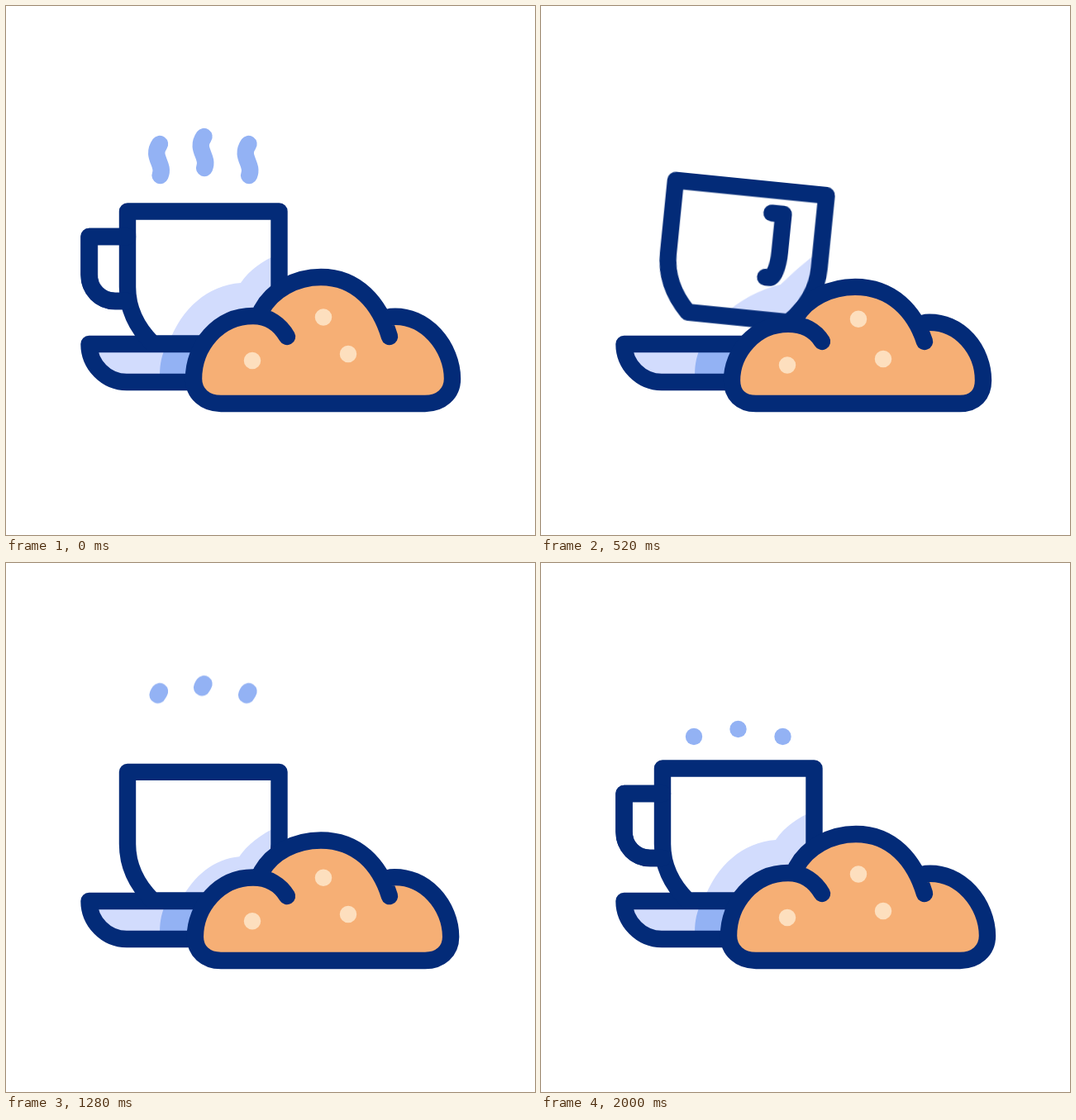
Write an HTML page without scripts that moves like this. It is 640 px wide and 640 px high and loops after 2040 ms.

```html
<!DOCTYPE html>
<html lang="en">
<head>
<meta charset="utf-8">
<title>Coffee and bread</title>
<style>
  html, body { margin: 0; width: 100%; height: 100%; overflow: hidden; background: #fff; }
  svg { display: block; width: 100%; height: 100%; }

  .line { fill: none; stroke: #032b78; stroke-width: 20.4; stroke-linecap: round; stroke-linejoin: round; }
  .pale { fill: #d2dcfd; }
  .blue { fill: #93b2f4; }
  .peach { fill: #f6af75; }
  .dots { fill: none; stroke: #fddfbe; stroke-width: 20.5; stroke-linecap: round; }
  .spark { fill: none; stroke: #fdcb50; stroke-width: 20.5; stroke-linecap: round; }
  .wisp { fill: none; stroke: #93b2f4; stroke-width: 20.4; stroke-linecap: round; }

  .cup, .handle, .rim, .shade, .bread, .dots, .spark, .rise, .wisp, .front {
    animation: 2.04s linear infinite;
  }

  /* Cup: hop and tilt about its lower left corner */
  .cup { transform-origin: 177.6px 408.5px; animation-name: hop; }
  @keyframes hop {
    0%, 18.63% { transform: translateY(0) rotate(0); animation-timing-function: cubic-bezier(.2, .5, .5, 1); }
    39.2% { transform: translateY(-61px) rotate(9.2deg); animation-timing-function: cubic-bezier(.33, 0, .67, .33); }
    60.78%, 100% { transform: translateY(0) rotate(0); }
  }

  .rim { animation-name: squash; }
  @keyframes squash {
    0%, 29.4%, 59.8%, 79.4%, 100% {
      d: path("M147 248.5H330.5V340C330.5 366 319.5 389 300 408.5H177.6C158 389 147 366 147 340Z");
      animation-timing-function: ease-in-out;
    }
    17.2% {
      d: path("M147 261.5H330.5V340C330.5 366 319.5 389 300 408.5H177.6C158 389 147 366 147 340Z");
      animation-timing-function: ease-in-out;
    }
    65.7% {
      d: path("M147 257H330.5V340C330.5 366 319.5 389 300 408.5H177.6C158 389 147 366 147 340Z");
      animation-timing-function: ease-in-out;
    }
  }

  /* Handle: one turn around the cup, in front first, then behind */
  .handle { transform-origin: 238.7px 0; animation-name: turn; }
  .handle path { vector-effect: non-scaling-stroke; }
  @keyframes turn {
    0% { transform: scaleX(1); }
    4.4% { transform: scaleX(.94); }
    8.8% { transform: scaleX(.766); }
    13.2% { transform: scaleX(.5); }
    17.65% { transform: scaleX(.173); }
    25.49% { transform: scaleX(-.303); }
    33.3% { transform: scaleX(-.755); }
    37.2% { transform: scaleX(-.91); }
    41.18% { transform: scaleX(-.988); }
    43.1% { transform: scaleX(-1); }
    47.1% { transform: scaleX(-.95); }
    52.94% { transform: scaleX(-.744); }
    58.3% { transform: scaleX(-.4); }
    63.7% { transform: scaleX(-.03); }
    69.1% { transform: scaleX(.37); }
    74.51% { transform: scaleX(.704); }
    80.4% { transform: scaleX(.93); }
    87%, 100% { transform: scaleX(1); }
  }
  .front { animation-name: front; animation-timing-function: step-end; }
  @keyframes front {
    0%, 87%, 100% { opacity: 1; }
    43.1% { opacity: 0; }
  }

  .shade { animation-name: shade; }
  @keyframes shade {
    0%, 71.6%, 100% {
      d: path("M197 408C212 366 244 338 284 335C294 320 310 308 330 300V340C330.5 366 319.5 389 300 408Z");
      animation-timing-function: ease-in-out;
    }
    17.65% {
      d: path("M204 408C222 378 248 358 283 355C293 342 310 333 330 326V340C330.5 366 319.5 389 300 408Z");
    }
    25.49% {
      d: path("M221 408C238 388 262 372 286 364C298 350 312 334 330 318V340C330.5 366 319.5 389 300 408Z");
      animation-timing-function: ease-out;
    }
    41.18% {
      d: path("M221 408C234 386 252 364 276 357C286 332 300 316 330 298V340C330.5 366 319.5 389 300 408Z");
      animation-timing-function: ease-in;
    }
    52.94% {
      d: path("M230 408C244 394 262 382 280 380C290 366 304 354 330 340V340C330.5 366 319.5 389 300 408Z");
      animation-timing-function: ease-in-out;
    }
  }

  /* Bread: left bump, base, right bump, then the dome */
  .bread { animation-name: bread; }
  @keyframes bread {
    0%, 70.6%, 100% {
      d: path("M340 400C332 386 318 375 299 375C256 375 227 412 227 451C227 469 241 481 260 481H507C526 481 540 469 540 451C540 413 508 372 465 376M464 400C452 360 425 328 381 328C350 328 322 344 309 368");
      animation-timing-function: ease-in-out;
    }
    17.2% {
      d: path("M340 412C332 402 318 395 299 395C256 395 233 428 233 456C233 471 243 481 260 481H507C523 481 533 471 533 456C533 423 508 388 465 391M464 411C452 379 425 355 379 355C350 355 322 366 309 386");
      animation-timing-function: ease-in;
    }
    25.49% {
      d: path("M340 406C332 393 318 385 299 385C258 385 231 420 231 453C231 470 242 481 260 481H507C525 481 535 470 535 453C535 418 508 380 465 383M464 406C452 370 425 340 380 340C350 340 322 354 309 376");
      animation-timing-function: ease-out;
    }
    41.18% {
      d: path("M340 394C330 378 316 366 297 366C256 366 227 404 227 446C227 467 241 481 260 481H507C526 481 539.5 467 539.5 446C540 402 510 362 465 367M464 394C452 345 422 310 381 310C345 310 318 336 309 364");
      animation-timing-function: ease-in;
    }
    52.94%, 56.9% {
      d: path("M340 405C332 392 318 384 299 384C258 384 230 420 230 453C230 470 242 481 260 481H507C525 481 537 470 537 453C537 417 508 380 465 383M464 405C452 368 425 340 381 340C350 340 322 354 309 377");
      animation-timing-function: ease-in-out;
    }
  }

  .dots { animation-name: dots; }
  @keyframes dots {
    0%, 70.6%, 100% { d: path("M384 376.5h0M298 429h0M414 421h0"); animation-timing-function: ease-in-out; }
    17.2% { d: path("M384 394.5h0M298 446.5h0M414 436h0"); animation-timing-function: ease-in; }
    25.49% { d: path("M384 379h0M298 434.5h0M414 427h0"); animation-timing-function: ease-out; }
    41.18% { d: path("M384 350h0M298 412h0M414 409h0"); animation-timing-function: ease-in; }
    52.94%, 56.9% { d: path("M384 383.5h0M298 436h0M414 427.5h0"); animation-timing-function: ease-in-out; }
  }

  .spark { animation-name: spark, flash; animation-timing-function: linear, step-end; }
  @keyframes spark {
    0%, 34.3% { d: path("M423 296L423 296M444 309L444 309"); }
    41.18% { d: path("M425 286L430 263M452 305.5L474.5 297"); }
    44.1% { d: path("M426.5 279L431 257M459 303L479.5 295.5"); }
    52.4%, 100% { d: path("M431 257L431 257M479.5 295.5L479.5 295.5"); }
  }
  @keyframes flash {
    0%, 54.9%, 100% { opacity: 0; }
    34.3% { opacity: 1; }
  }

  /* Steam: each wisp grows from below and shrinks at its top while drifting up */
  .rise { animation-name: rise, puff; animation-timing-function: linear, step-end; }
  @keyframes rise {
    0% { transform: translateY(0); }
    17.65% { transform: translateY(-13px); }
    21.5% { transform: translateY(-15px); }
    36.8% { transform: translateY(1px); }
    41.18% { transform: translateY(0); }
    52.94% { transform: translateY(-6px); }
    65.2% { transform: translateY(-13px); }
    72% { transform: translateY(25px); }
    74.51% { transform: translateY(23px); }
    98.04% { transform: translateY(2px); }
    100% { transform: translateY(0); }
  }
  @keyframes puff {
    0%, 72%, 100% { opacity: 1; }
    20.5%, 65.2% { opacity: 0; }
    36.8% { opacity: 1; }
  }
  .wisp { animation-name: trim; }
  @keyframes trim {
    0% { stroke-dasharray: 100 300; stroke-dashoffset: 0; animation-timing-function: cubic-bezier(.4, .2, .7, .9); }
    17.65% { stroke-dasharray: 18 300; stroke-dashoffset: -82; }
    20.5% { stroke-dasharray: 0 300; stroke-dashoffset: -100; }
    20.6%, 36.8% { stroke-dasharray: 0 300; stroke-dashoffset: 0; }
    41.18% { stroke-dasharray: 28 300; stroke-dashoffset: 0; }
    47.1% { stroke-dasharray: 60 300; stroke-dashoffset: -2; }
    52.94% { stroke-dasharray: 68 300; stroke-dashoffset: -12; }
    58.8% { stroke-dasharray: 45 300; stroke-dashoffset: -50; }
    65.1% { stroke-dasharray: 0 300; stroke-dashoffset: -100; }
    65.2%, 74.51% { stroke-dasharray: 0 300; stroke-dashoffset: 0; }
    98.04% { stroke-dasharray: 93 300; stroke-dashoffset: 0; }
    100% { stroke-dasharray: 100 300; stroke-dashoffset: 0; }
  }
</style>
</head>
<body>
<svg viewBox="0 0 640 640" xmlns="http://www.w3.org/2000/svg">
  <defs>
    <path id="wisp" class="wisp" pathLength="100" d="M185 208C195 192 174 184 186 167"/>
    <path id="loop" d="M147 279H100.5V325C100.5 343 114 357 132 357H147"/>
  </defs>

  <path class="pale" d="M300 409H100.5C100.5 434 121 455 146 455H300Z"/>
  <path class="blue" d="M192 415C187 427 186 437 186 448H300V415Z"/>
  <path class="line" d="M300 409H100.5C100.5 434 121 455 146 455H300"/>

  <g class="cup">
    <g class="rise">
      <use href="#wisp"/>
      <use href="#wisp" x="53.5" y="-9"/>
      <use href="#wisp" x="107.5"/>
    </g>
    <g class="handle">
      <path class="line" d="M147 279H100.5V325C100.5 343 114 357 132 357H147"/>
    </g>
    <path class="rim" fill="#fff" d="M147 248.5H330.5V340C330.5 366 319.5 389 300 408.5H177.6C158 389 147 366 147 340Z"/>
    <path class="shade pale"/>
    <path class="rim line" d="M147 248.5H330.5V340C330.5 366 319.5 389 300 408.5H177.6C158 389 147 366 147 340Z"/>
    <g class="front">
      <g class="handle">
        <path class="line" d="M147 279H100.5V325C100.5 343 114 357 132 357H147"/>
      </g>
    </g>
  </g>

  <path class="spark"/>

  <path class="bread peach"/>
  <rect class="peach" x="322" y="366" width="90" height="60"/>
  <path class="bread line"/>
  <path class="dots"/>
</svg>
</body>
</html>
```
